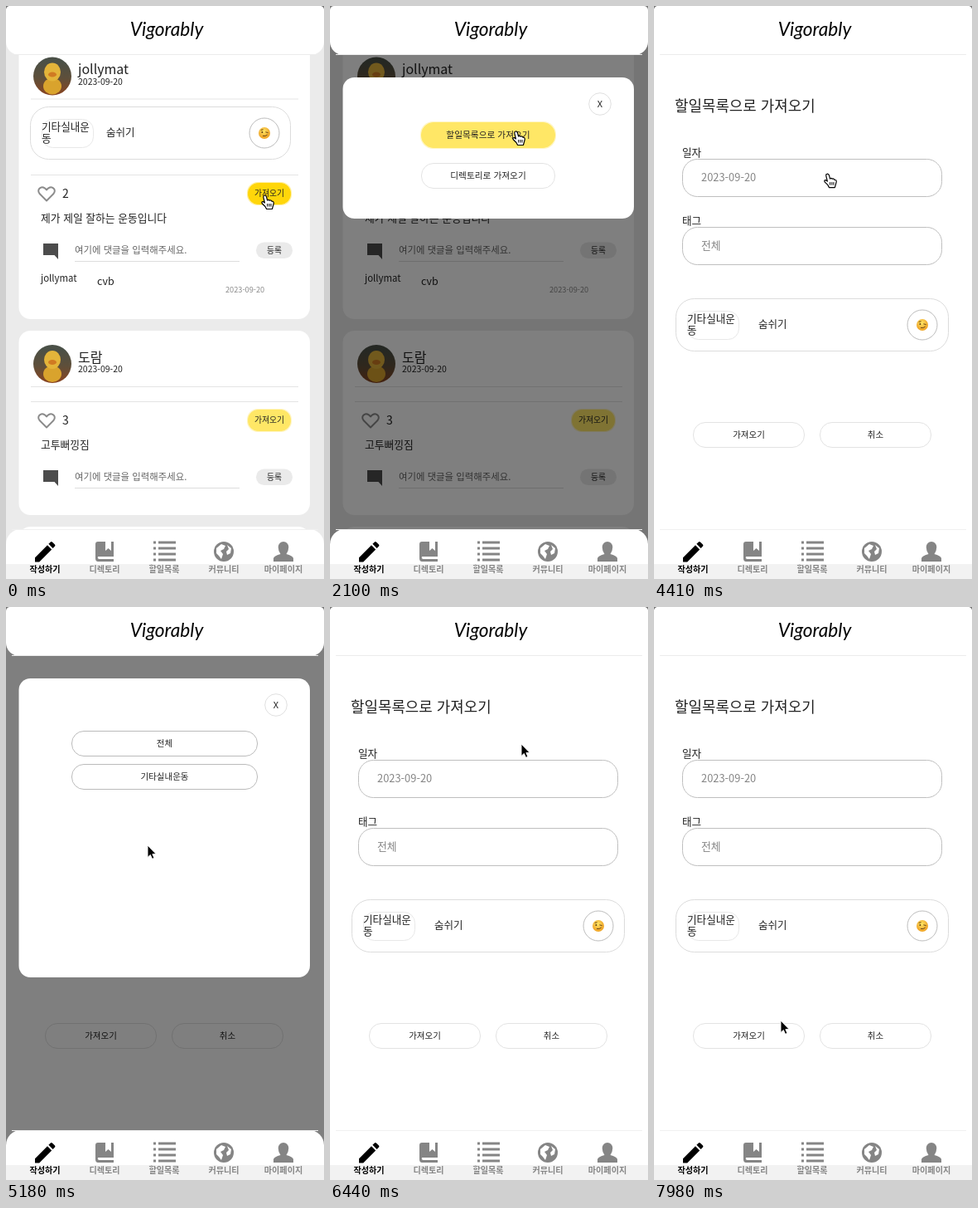
These frames come from a looping animation (384 px wide and 690 px high, 8 s). An HTML page:

```html
<!DOCTYPE html>
<html lang="ko">
<head>
<meta charset="utf-8">
<style>
html, body { margin: 0; width: 100%; height: 100%; overflow: hidden; background: #777; }
svg { display: block; width: 384px; height: 690px; }
text { font-family: "Noto Sans CJK KR", "Noto Sans CJK", "Noto Sans KR", sans-serif; white-space: pre; }
.logo { font: italic 22.7px Lato, sans-serif; }
.toast { filter: drop-shadow(1px 0 4px #0005); }
</style>
</head>
<body>
<svg id="stage" viewBox="0 0 384 690"></svg>
<script>
const stage = document.getElementById('stage');
const LOOP = 8000, STEP = 70;
const YELLOW = '#ffe766', GOLD = '#ffd60a', INK = '#222', GRAY = '#858585';

// Pointer waypoints: time, x, y of the hot spot
const route = [
  [0, 313, 228], [1120, 312, 228], [1190, 309, 226], [1330, 271, 221], [1610, 271, 221],
  [2100, 225, 151], [3220, 225, 151], [3500, 222, 189], [3570, 222, 189], [3780, 210, 202],
  [4400, 210, 202], [4900, 171, 287], [5670, 171, 287], [5950, 232, 195], [6300, 231, 165],
  [6440, 231, 165], [7070, 200, 440], [7630, 200, 440], [7980, 153, 498], [8000, 153, 498]
];

let pointer, overControl;

function pointerAt(t) {
  const i = Math.max(1, route.findIndex(p => p[0] >= t));
  const [t0, x0, y0] = route[i - 1], [t1, x1, y1] = route[i];
  const u = (t - t0) / (t1 - t0), k = u * u * (3 - 2 * u);
  return [x0 + (x1 - x0) * k, y0 + (y1 - y0) * k];
}

// True when the pointer is inside the box of an active control
function hit(x, y, w, h, active) {
  const [px, py] = pointer;
  const inside = active && px >= x && px <= x + w && py >= y && py <= y + h;
  if (inside) overControl = true;
  return inside;
}

const rect = (x, y, w, h, r, fill, stroke = 'none', more = '') =>
  `<rect x="${x}" y="${y}" width="${w}" height="${h}" rx="${r}" fill="${fill}" stroke="${stroke}" ${more}/>`;
const circle = (x, y, r, fill, stroke = 'none') =>
  `<circle cx="${x}" cy="${y}" r="${r}" fill="${fill}" stroke="${stroke}"/>`;
const path = (d, fill, stroke = 'none', width = 1) =>
  `<path d="${d}" fill="${fill}" stroke="${stroke}" stroke-width="${width}" stroke-linejoin="round"/>`;
const line = (x1, x2, y, color = '#e4e4e4') => path(`M${x1} ${y + .5}H${x2}`, 'none', color);
const at = (x, y, content, scale = 1) => `<g transform="translate(${x} ${y}) scale(${scale})">${content}</g>`;

// y is the vertical middle of the letters
const text = (x, y, s, size, fill = INK, more = '') =>
  `<text x="${x}" y="${y + size * .36}" font-size="${size}" fill="${fill}" ${more}>${s}</text>`;
const label = (x, y, s, size, fill, weight = 400) =>
  text(x, y, s, size, fill, `text-anchor="middle" font-weight="${weight}"`);

function button(x, y, w, h, s, { active, size = 10.5, border = '#e3e3e3', fill = '#fff', hover = YELLOW }) {
  const on = hit(x, y, w, h, active), color = on ? hover : fill;
  const edge = color === '#fff' ? border : color;
  const glow = color === '#fff' ? '' : rect(x - 1, y - 1, w + 2, h + 2, h / 2, color, 'none', 'opacity=".4"');
  return glow + rect(x + .5, y + .5, w - 1, h - 1, h / 2 - 1, color, edge) + label(x + w / 2, y + h / 2 - .5, s, size);
}

const avatar = (x, y) => at(x, y, circle(0, 0, 23, 'url(#photo)') +
  `<ellipse cy="12" rx="11" ry="10" fill="#d9a32d"/><ellipse cy="-5" rx="10" ry="11" fill="#e3b43a"/>` +
  `<ellipse cy="-2" rx="5" ry="3" fill="#d07a22"/>`);

const wink = (x, y) => at(x, y, circle(0, 0, 18, '#fff', '#bdbdbd') + circle(0, 0, 7, 'url(#face)') +
  circle(-2.6, -1, 1, '#5b3a12') +
  path('M1.4 -1.2L4.6 -.4M-4.2 -3.6L-1.4 -4.2M-2 3.4Q1.5 4.2 3.6 2', 'none', '#5b3a12', .9));

const exercise = (x, y, w, emojiX, dx) => rect(x + .5, y + .5, w - 1, 63, 22, '#fff', '#dcdcdc') +
  rect(x + 14.5, y + 15.5, 62, 34, 13, '#fff', '#e8e8e8') +
  text(x + 14, y + 24, '기타실내운', 12.6) + text(x + 14, y + 38, '동', 12.6) +
  text(x + dx, y + 31, '숨쉬기', 12.5) + wink(emojiX, y + 32);

const postHead = (y, name) => avatar(56, y) + text(87, y - 8, name, 16) +
  text(87, y + 6.5, '2023-09-20', 10.5) + line(30, 353, y + 27);

function postBody(y, likes, words, active) {
  return line(30, 353, y - 23) +
    path(`M49 ${y + 8.5}L40.5 ${y}C36 ${y - 6} 44 ${y - 11} 49 ${y - 4.5}C54 ${y - 11} 62 ${y - 6} 57.5 ${y}Z`, '#fff', '#8b8b8b', 2) +
    text(68, y, likes, 14) +
    button(292, y - 13, 52, 26, '가져오기', { active, size: 9.8, fill: YELLOW, hover: GOLD }) +
    text(42, y + 29, words, 12.8) +
    path(`M45 ${y + 60}H63V${y + 79}L58.5 ${y + 74}H45Z`, '#4c4c4c') +
    text(83, y + 67.5, '여기에 댓글을 입력해주세요.', 11.4, '#666') + line(83, 282, y + 81, '#ddd') +
    rect(302, y + 58.5, 44, 19.5, 9.7, '#eaeaea') + label(324, y + 68, '등록', 9.8, INK, 500);
}

const card = (y, h) => rect(15.5, y, 351.5, h, 14, '#fff');

const feed = active => rect(0, 0, 384, 690, 0, '#ebebeb') +
  card(30, 347) + card(391, 222) + card(627, 60) +
  postHead(84.5, 'jollymat') + exercise(29, 121, 315, 312, 92) +
  postBody(226, '2', '제가 제일 잘하는 운동입니다', active) +
  text(42, 328, 'jollymat', 11.4) + text(110, 331, 'cvb', 12.5) + text(265, 342, '2023-09-20', 9.2, '#8a8a8a') +
  postHead(431, '도람') + postBody(499, '3', '고투뻐낑짐', active);

function field(y, name, value, active) {
  hit(34, y, 314, 46, active);
  return text(34, y - 8, name, 12.6) + rect(34.5, y + .5, 313, 45, 18, '#fff', '#bfbfbf') +
    text(57, y + 22.5, value, 12.9, '#858585');
}

function form(loaded, active) {
  const top = loaded ? 184 : 211, foot = loaded ? 501 : 465;
  return rect(0, 0, 384, 690, 0, '#fff') +
    text(25, loaded ? 120.5 : 157.5, '할일목록으로 가져오기', 17.9) +
    field(top, '일자', '2023-09-20', active) + field(top + 82, '태그', '전체', active) +
    (loaded ? exercise(26, 352, 330, 324, 100) : '') +
    button(47, foot, 135, 31, '가져오기', { active }) + button(200, foot, 135, 31, '취소', { active });
}

const modal = (h, content) => rect(0, 0, 384, 690, 0, '#000', 'none', 'opacity=".5"') +
  rect(15.5, 86, 351.5, h, 14, '#fff') + circle(326, 118, 13.3, '#fff', '#e0e0e0') +
  label(326, 118, 'X', 11) + content;

const importMenu = () => modal(170,
  button(110, 140, 162, 31, '할일목록으로 가져오기', { active: true, size: 10.7 }) +
  button(110, 189, 162, 31, '디렉토리로 가져오기', { active: true, size: 10.7 }));

const tagMenu = () => modal(360,
  button(79, 149, 225, 31, '전체', { active: true, border: '#bbb' }) +
  button(79, 189, 225, 31, '기타실내운동', { active: true, border: '#bbb' }));

const icons = [
  path('M-12 7.2V12.4H-6.8L8.2 -2.6L3 -7.8ZM12 -6.4Q12.9 -7.4 12 -8.5L8.9 -11.6Q7.8 -12.5 6.8 -11.6L4.4 -9.2L9.6 -4Z', '#000'),
  path('M-8 -12H11V6H-8Q-9 8 -7 9H11V12H-8Q-11 12 -11 8V-9Q-11 -12 -8 -12Z', GRAY) + path('M1 -12H8V-1L4.5 -4L1 -1Z', '#fff'),
  [-11, -4, 3, 10].map(y => rect(-13, y - 1.5, 3, 3, 0, GRAY) + rect(-7, y - 1.5, 21, 3, 0, GRAY)).join(''),
  circle(0, 0, 12, GRAY) + path('M-9 -4L-3 -9L2 -7L0 -3L-4 -1L-1 3L-3 9L-6 5L-9 2ZM4 -8L9 -4L8 2L4 4L3 0L6 -3Z', '#fff'),
  path('M-12 12V8Q-11 5 -3.5 3Q-6.3 -1 -6.3 -5.5Q-5.5 -12 0 -12Q5.5 -12 6.3 -5.5Q6.3 -1 3.5 3Q11 5 12 8V12Z', GRAY)
];
const tabs = ['작성하기', '디렉토리', '할일목록', '커뮤니티', '마이페이지'];

const bars = () =>
  rect(0, -20, 384, 79, 16, '#fff') + line(7, 377, 58, '#ececec') +
  '<text class="logo" x="194" y="36" text-anchor="middle" fill="#000">Vigorably</text>' +
  rect(0, 630, 384, 80, 18, '#fff') + line(7, 377, 630, '#f0f0f0') +
  rect(0, 672, 384, 18, 0, '#000', 'none', 'opacity=".05"') +
  tabs.map((s, i) => at(47 + 72 * i, 657, icons[i]) + label(47 + 72 * i, 678, s, 10.1, i ? GRAY : '#000', 700)).join('');

const toast = opacity => `<g class="toast" opacity="${opacity}">` +
  rect(-8, 673, 24, 24, 2, '#f6d84b') + text(-1, 684, '...', 11, INK, 'font-weight="700"') + '</g>';

const arrow = path('M0 0V15.5L3.6 12.3L6 17.6L8.6 16.5L6.3 11.4H11Z', '#000', '#fff');
const hand = at(-5, -1,
  path('M4 1Q6 .6 6.6 3L7.6 7Q9.2 5.5 10.2 7.2Q12.2 6.2 12.8 8.2Q15.3 7.8 15.3 10.5L14.4 14L13.4 17.5H6.6L5 14.5L1.2 10.8Q.2 8.4 2.4 8.6L4.4 10L2.8 3.2Q2.6 1.2 4 1Z', '#fff', '#000', 1.2) +
  path('M7.7 11V14.5M9.9 11V14.5M12 11V14.5', 'none', '#000'));

const defs = `<defs>
  <linearGradient id="photo" x2="0" y2="1"><stop offset=".1" stop-color="#4a5047"/><stop offset=".55" stop-color="#5e4f3a"/><stop offset="1" stop-color="#8a4420"/></linearGradient>
  <radialGradient id="face" cx=".45" cy=".35"><stop stop-color="#ffe867"/><stop offset="1" stop-color="#f0a92c"/></radialGradient>
  <clipPath id="window"><rect width="384" height="720" rx="5"/></clipPath>
</defs>`;

function scene(t) {
  pointer = pointerAt(t);
  overControl = false;
  let page;
  if (t < 2590) {
    const open = t >= 490;
    page = feed(!open) + (open ? importMenu() : '');
  } else {
    const open = t >= 5180 && t < 6440;
    page = form(t >= 2660, !open) + (open ? tagMenu() : '');
  }
  const fade = t < 2590 ? 0 : Math.max(0, Math.min(1, (3080 - t) / 210));
  return defs + `<g clip-path="url(#window)">${page}${bars()}${fade ? toast(fade) : ''}</g>` +
    at(...pointer, overControl ? hand : arrow, overControl ? 1 : .93);
}

let shown = -1;
function tick() {
  const t = Math.floor(performance.now() % LOOP / STEP) * STEP;
  if (t !== shown) stage.innerHTML = scene(shown = t);
  requestAnimationFrame(tick);
}
tick();
</script>
</body>
</html>
```
